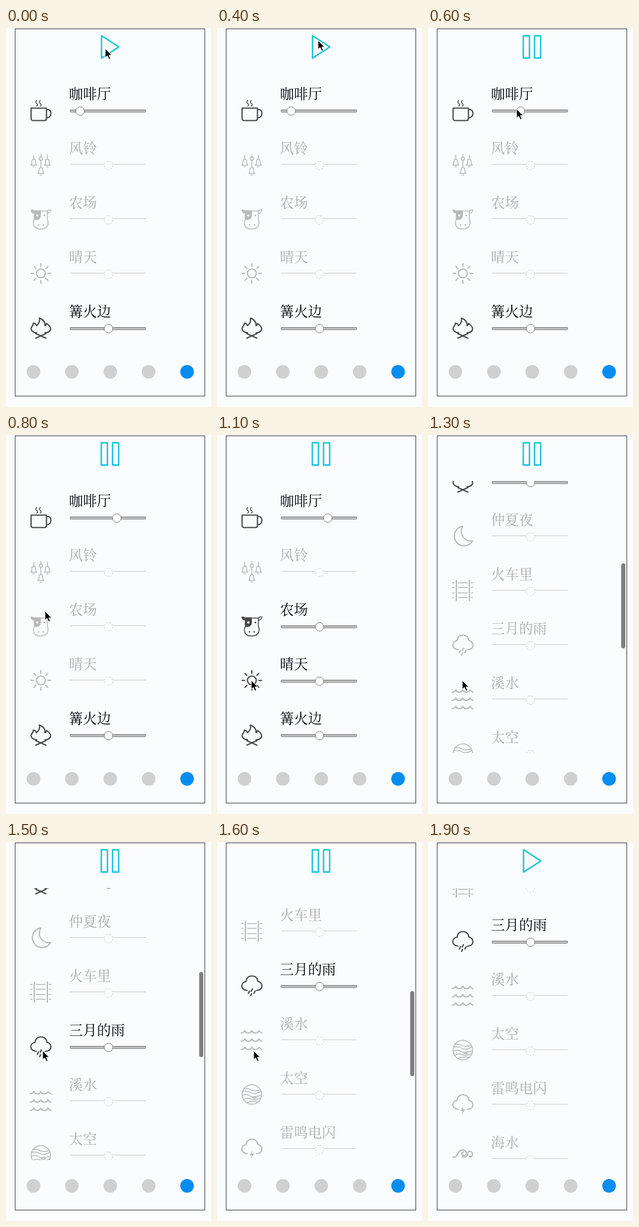
Animation, 347 px wide and 641 px high, one loop 2000 ms. Source, as an HTML page:

```html
<!DOCTYPE html>
<html lang="zh-CN">
<head>
<meta charset="utf-8">
<title>环境音</title>
<style>
  html, body { margin: 0; width: 100%; height: 100%; overflow: hidden; background: #fbfcfe; }
  svg { display: block; width: 347px; height: 641px; }
  text { font: 400 23.7px "Noto Serif CJK SC", "Songti SC", "Noto Sans CJK SC", "Noto Sans CJK", serif; }
  .row { --ink: #b9b9b9; --text: #acacac; }
  .row.on { --ink: #464646; --text: #05050f; }
  .row text { fill: var(--text); }
  .icon { fill: none; stroke: var(--ink); stroke-width: 2.1; stroke-linecap: round; stroke-linejoin: round; }
  .icon .thin { stroke-width: 1.5; }
  .icon .solid { fill: var(--ink); stroke: none; }
  .icon .hole { fill: #fbfcfe; stroke: none; }
  .track { fill: none; }
  .edge { stroke: #cbcbcb; }
  .thumb { fill: #fbfcfe; stroke: #cfcfcf; stroke-dasharray: 3 2; }
  .on .track { fill: #bdbdbd; stroke: #929292; }
  .on .edge { stroke: #777; }
  .on .thumb { fill: #fff; stroke: #777; stroke-dasharray: none; }
</style>
</head>
<body>
<svg id="stage" viewBox="0 0 347 641">
  <defs>
    <clipPath id="view"><rect x="16" y="78" width="320" height="460"/></clipPath>
    <linearGradient id="teal" gradientUnits="userSpaceOnUse" x1="0" y1="12" x2="0" y2="52">
      <stop offset="0" stop-color="#17cbd0"/><stop offset="1" stop-color="#12bfe4"/>
    </linearGradient>
  </defs>
  <rect width="347" height="641" fill="#fbfcfe"/>
  <g id="list" clip-path="url(#view)"><g id="rows"></g></g>
  <g fill="none" stroke="url(#teal)" stroke-width="2.4" stroke-linejoin="round">
    <path id="play" d="M161.7 13L191 32 161.7 51z"/>
    <path id="pause" d="M161.3 13.2h10.4v37.6h-10.4zM180.3 13.2h10.4v37.6h-10.4z"/>
  </g>
  <g id="dots"></g>
  <rect id="bar" x="327" width="7" height="144" rx="3.5" fill="#808080"/>
  <rect x="15.5" y="1.5" width="321" height="621" fill="none" stroke="#3c3c3c"/>
  <path id="cursor" d="M0 0V15.2l3.5-3.2 2.7 5.8 2.6-1.1-2.6-5.6H11z" fill="#000" stroke="#fff" stroke-width="1"/>
</svg>
<script>
const $ = id => document.getElementById(id);
const path = (d, cls = '') => `<path class="${cls}" d="${d}"/>`;
const disc = (x, y, r, cls = '') => `<circle class="${cls}" cx="${x}" cy="${y}" r="${r}"/>`;
const at = (x, y, body) => `<g transform="translate(${x} ${y})">${body}</g>`;

const cloud = path('M10 26C4 26 1 22 1 18.500C1 14.500 4 11.500 8 11C9 4.500 13 1.500 18 1.500C23.500 1.500 27.500 5 28.500 11C32 11 35 14.500 35 18.500C35 23 31.500 26 26 26');
const bell = path('M0-7V-1M-5 10q2-2 2-6.500a3 3.500 0 0 1 6 0q0 4.500 2 6.500zM-1.500 12.500q1.500 1 3 0', 'thin');
const wave = path('M0 6q5-1 6-4 2 4 6 4 4 0 6-4 2 4 6 4 4 0 6-4 2 3 5 4');

const sunRays = [...Array(8)].map((_, i) => {
  const a = i * Math.PI / 4, c = Math.cos(a), s = Math.sin(a);
  return `M${18 + 12 * c} ${18 + 12 * s}L${18 + 16.500 * c} ${18 + 16.500 * s}`;
}).join('');
const ties = [5, 13, 22, 30].map(y => `M.5 ${y}h3M10.5 ${y}h15M32 ${y}h3`).join('');

const icons = {
  coffee: path('M1.500 14.500H27.500V32q0 3.500-3.500 3.500H5q-3.500 0-3.500-3.500zM28 17h2.500q4.500 1 4.500 6 0 7-7 8') +
    path('M11 1.500q-3 2.500 0 5t0 4.500M17 1.500q-3 2.500 0 5t0 4.500', 'thin'),
  bells: at(6, 9, bell) + at(29, 9, bell) + at(18, 23, bell) + disc(18, 8, 2.800, 'thin') + path('M18 1v4M18 11v4', 'thin'),
  cow: path('M7 4.500H29V19q2 3 1 8-2 8-12.500 8T5.500 27q-.5-5 1.500-8z', 'thin') +
    path('M7 4q-3-3-6.500-1.500Q1 9 7 8.500zM6.500 3.500H18V12q0 6-6 7.500-4 .5-5.500-1z', 'solid') +
    path('M29 4.500q3-3 6-1.500-.5 5-6 5.500', 'thin') +
    disc(12, 12, 2, 'hole') + disc(24, 12, 1.500, 'solid') + disc(14, 28, 1.300, 'solid') + disc(22, 28, 1.300, 'solid'),
  sun: disc(18, 18, 7.500) + path(sunRays),
  fire: path('M11 26.500C4 26 1 22 1.500 19C2 15.500 5.500 14 5.500 10Q10 11 10.500 14.500C15 11 16.500 6 15.500 1.500C22 4 25.500 9 25 14.500Q27.500 13.500 27.500 10.500C31 13 34.500 17 34.500 20C34.500 24 30 26.500 25 26.500M9.500 35.500L26.500 28M9.500 28L26.500 35.500'),
  moon: path('M18 1.500A16.500 16.500 0 1 0 34.500 26A16 16 0 0 1 18 1.500z'),
  rails: path('M7 1V35M29 1V35') + path(ties, 'thin'),
  rain: cloud + path('M14 27l-2 4M19 23.500l-2 4M23.500 27l-2 4M17.500 31.500l-1.500 3.500'),
  stream: [0, 14, 28].map(y => at(0, y, wave)).join(''),
  space: disc(18, 18, 16.500, 'thin') +
    path('M5 8q7-1 11 2t17 0M2.500 13q8-2 14 2t16-2M2 20q6-4 12 0t20-1M4 27q7-5 13-1t15-2M10 32q7-4 18-1M19 24q4-3 7 0-4 2-7 0', 'thin'),
  storm: cloud + path('M19 21l-5 8h4l-2 6 6-9h-4z', 'solid'),
  sea: path('M1 15q5 1 8-5 4-9 11-7 6 3 3 8-4 3-7-1 0-4 4-4M17 14q6 3 9-3 0-6 4-6 5 1 4 7-2 4-5 1M5 25q4-6 9 0M21 25q4-6 9 0')
};

const rows = [
  ['咖啡厅', 'coffee'], ['风铃', 'bells'], ['农场', 'cow'], ['晴天', 'sun'],
  ['篝火边', 'fire'], ['仲夏夜', 'moon'], ['火车里', 'rails'], ['三月的雨', 'rain'],
  ['溪水', 'stream'], ['太空', 'space'], ['雷鸣电闪', 'storm'], ['海水', 'sea']
];

$('rows').innerHTML = rows.map(([name, icon], i) => `
  <g class="row" transform="translate(0 ${110 + 92 * i})">
    <g class="icon" transform="translate(41 11)">${icons[icon]}</g>
    <text x="106.500" y="9.500">${name}</text>
    <rect class="track" x="108.500" y="28.500" width="128" height="4" rx="1.500"/>
    <path class="edge" d="M108.500 28.500h128"/>
    <circle class="thumb" cx="173.500" cy="30.500" r="7.200"/>
  </g>`).join('');

$('dots').innerHTML = [0, 1, 2, 3, 4].map(i =>
  `<circle cx="${46.5 + 65 * i}" cy="581.500" r="11.500" fill="${i < 4 ? '#d0d0d0' : '#058df0'}"/>`).join('');

const rowEls = [...document.querySelectorAll('.row')];
const thumb = rowEls[0].querySelector('.thumb');

// Key points: [step, values...], one step is 100 ms
const pointer = [[0, 168, 35], [4, 171, 21], [5, 171, 21], [6, 150, 137], [7, 187, 139], [8, 66, 298],
  [9, 62, 318], [11, 58, 415], [13, 58, 415], [15, 62, 353], [16, 62, 353], [18, 169, 20]];
const scrolling = [[11, 0], [12, 230], [13, 428], [14, 437], [15, 437], [16, 540], [17, 615]];
const volume = [[5, 125.5], [7, 187.5]];
const switchOn = { 0: 0, 4: 0, 2: 9, 3: 11, 7: 15 };

function sample(keys, s) {
  const next = keys.findIndex(k => k[0] > s);
  if (next < 0) return keys[keys.length - 1].slice(1);
  if (next === 0) return keys[0].slice(1);
  const a = keys[next - 1], b = keys[next], p = (s - a[0]) / (b[0] - a[0]);
  return a.slice(1).map((v, i) => v + (b[i + 1] - v) * p);
}

const show = (el, yes) => el.setAttribute('visibility', yes ? 'visible' : 'hidden');

function draw(time) {
  const step = Math.floor(time % 2000 / 100);
  const playing = step >= 5 && step < 18;
  const scroll = Math.round(sample(scrolling, step)[0]);
  const [x, y] = sample(pointer, step);

  show($('pause'), playing);
  show($('play'), !playing);
  show($('cursor'), step < 19);
  show($('bar'), step >= 12 && step < 18);
  $('cursor').setAttribute('transform', `translate(${x} ${y})`);
  $('bar').setAttribute('y', 83 + scroll * 0.313);
  $('rows').setAttribute('transform', `translate(0 ${-scroll})`);
  thumb.setAttribute('cx', sample(volume, step)[0]);
  rowEls.forEach((el, i) => el.classList.toggle('on', step >= switchOn[i]));
}

const start = performance.now();
function tick() {
  draw(performance.now() - start);
  requestAnimationFrame(tick);
}
tick();
</script>
</body>
</html>
```
